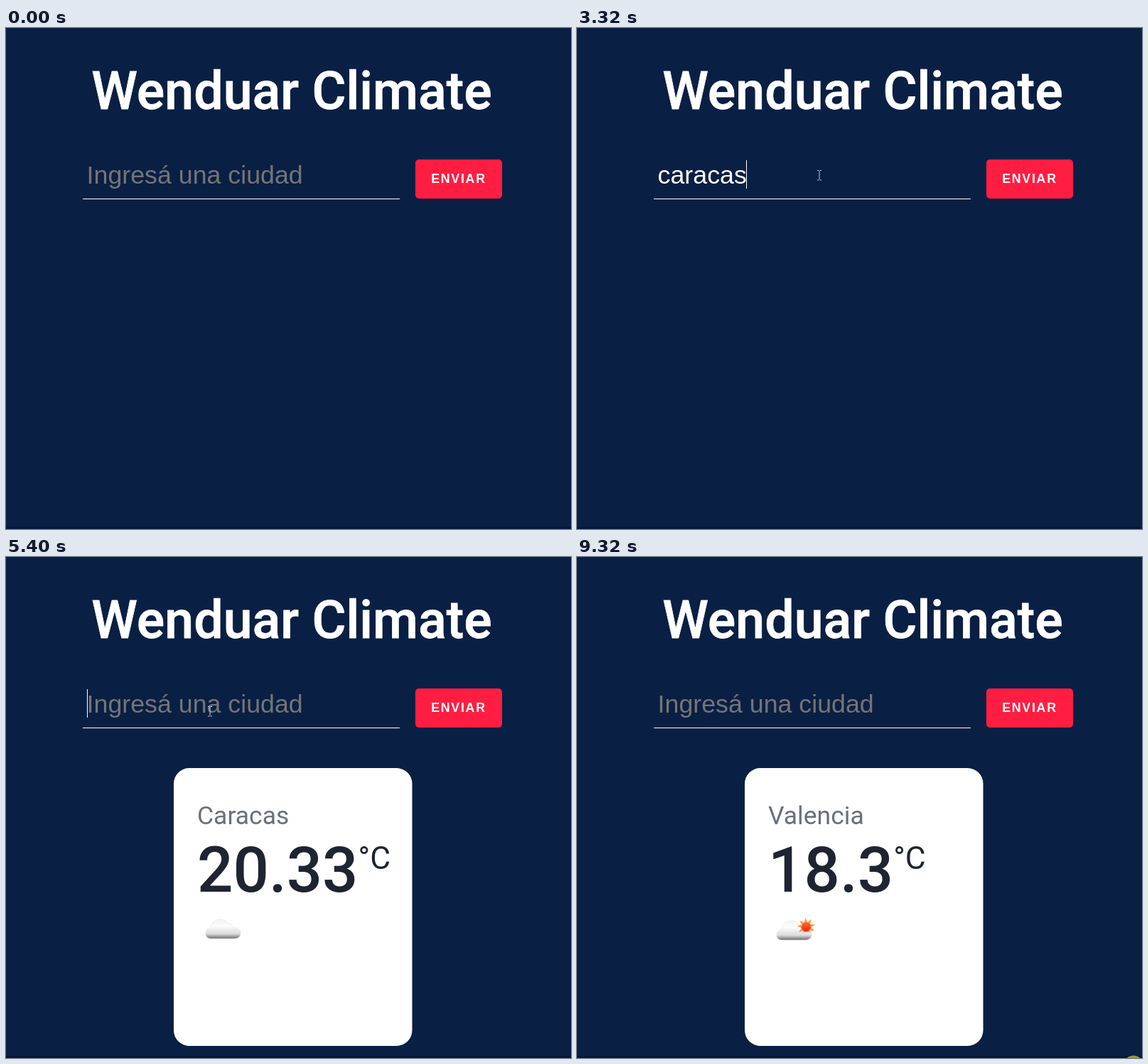
An HTML page that plays this animation: 795x705 px, repeating every 9410 ms.

```html
<!DOCTYPE html>
<html lang="es">
<head>
<meta charset="utf-8">
<title>Clima</title>
<style>
  html, body { margin: 0; width: 100%; height: 100%; overflow: hidden; background: #0a1f44; }
  svg { display: block; width: 795px; height: 705px; }
  text { white-space: pre; }
  .roboto { font-family: Roboto, sans-serif; }
  .arial { font-family: "Liberation Sans", Arial, sans-serif; }
  #title { font-size: 73.5px; font-weight: 500; fill: #fff; stroke: #fff; stroke-width: .8px; text-anchor: middle; }
  #field { font-size: 35.75px; }
  #label { font-size: 17.75px; font-weight: 700; letter-spacing: 1.75px; fill: #fff; }
  #city { font-size: 35.5px; fill: #6a6f7c; }
  #temp { font-size: 88.75px; font-weight: 500; fill: #1e2432; }
  #unit { font-size: 44.4px; fill: #1e2432; }
</style>
</head>
<body>
<svg viewBox="0 0 795 705">
  <defs>
    <linearGradient id="cloudFill" x2="0" y2="1">
      <stop offset="0" stop-color="#f4f4f4"/>
      <stop offset=".35" stop-color="#fcfcfc"/>
      <stop offset=".75" stop-color="#dcdcdc"/>
      <stop offset="1" stop-color="#6c6c6c"/>
    </linearGradient>
    <linearGradient id="sunFill" x2="0" y2="1">
      <stop offset="0" stop-color="#ff6a35"/>
      <stop offset="1" stop-color="#f3200f"/>
    </linearGradient>
    <clipPath id="aboveCloud"><rect x="305" y="500" width="35" height="28"/></clipPath>
  </defs>
  <rect width="795" height="705" fill="#0a1f44"/>
  <rect y="702" width="795" height="3" fill="#061638"/>
  <text id="title" class="roboto" x="402" y="114">Wenduar Climate</text>

  <text id="field" class="arial" x="113.6" y="218.5"></text>
  <rect x="108" y="240" width="446" height="1" fill="#fff"/>
  <rect id="caret" y="186" width="1" height="40" fill="#fff"/>
  <rect x="576" y="185" width="122" height="55" rx="5" fill="#ff1e42"/>
  <rect id="hover" x="576" y="185" width="122" height="55" rx="5" fill="#c3112d" opacity=".3"/>
  <text id="label" class="arial" x="598.2" y="218">ENVIAR</text>

  <g id="card">
    <rect x="236" y="297" width="335.5" height="391" rx="22" fill="#fff"/>
    <text id="city" class="roboto" x="269" y="376"></text>
    <text id="temp" class="roboto" x="269" y="470.5"></text>
    <text id="unit" class="roboto" y="439">°C</text>
    <path id="cloud" fill="url(#cloudFill)" stroke="#ddd" stroke-width=".5"
      d="M288 537q-8-1-7-8 1-6 7-7 2-12 13-12 8 0 11 6 6-1 8 5 10 1 10 8 0 8-9 8z"/>
    <g id="sun" clip-path="url(#aboveCloud)">
      <polygon id="rays" fill="#f6a04d"/>
      <circle cx="322.5" cy="520.5" r="6.5" fill="url(#sunFill)"/>
    </g>
  </g>

  <path id="arrow" fill="#fff" stroke="#111a2c" stroke-width=".6"
    d="M0 0V14L3.2 11 5.6 16.4 7.9 15.4 5.5 10.2H9.8Z"/>
  <path id="beam" fill="none" stroke="#c9ced8" d="M-3-6.5H-.8M.8-6.5H3M0-6V6.5M-3 7H-.8M.8 7H3"/>
  <circle id="click" cx="783" cy="716" r="14.5" fill="#a09a1e"/>
</svg>
<script>
const LOOP = 9410, BLINK = 525, FOCUS = 680, ICON_DELAY = 1020, LAST_CLICK = 9320;
const $ = id => document.getElementById(id);
const show = (id, on) => $(id).style.display = on ? '' : 'none';

// Typing starts at `from`, one letter every `step` ms, submitted at `sent`.
const searches = [
  { city: 'Caracas', temp: '20.33', from: 1060, step: 196, sent: 3380 },
  { city: 'Valencia', temp: '18.3', from: 5570, step: 146, sent: 7290 }
];

// The pointer rests between these glides.
const home = { x: 622, y: 514 };
const glides = [
  { start: 70, end: 600, x: 331, y: 207 },
  { start: 3230, end: 3320, x: 341, y: 207 },
  { start: 3380, end: 3380, x: 771, y: 255 },
  { start: 3470, end: 3550, x: 800, y: 238 },
  { start: 3850, end: 4550, x: 287, y: 217 },
  { start: 8070, end: 8770, x: 708, y: 682 },
  { start: 9240, end: LAST_CLICK, x: 783, y: 716 }
];

const easeOut = k => 1 - (1 - k) ** 2.3;

function pointerAt(t) {
  let { x, y } = home;
  for (const g of glides) {
    if (t < g.start) break;
    const k = t >= g.end ? 1 : easeOut((t - g.start) / (g.end - g.start));
    x += (g.x - x) * k;
    y += (g.y - y) * k;
  }
  return [x, y];
}

function drawField(t) {
  const field = $('field');
  const search = searches.filter(s => t >= s.from).pop();
  const typing = search && t < search.sent;
  let text = 'Ingresá una ciudad', lastInput = FOCUS;
  if (search) {
    const word = search.city.toLowerCase();
    const count = Math.min(word.length, 1 + Math.floor((t - search.from) / search.step));
    lastInput = search.from + (count - 1) * search.step;
    if (typing) text = word.slice(0, count);
  }
  field.textContent = text;
  field.setAttribute('fill', typing ? '#fff' : '#757575');
  const width = typing ? field.getComputedTextLength() : 0.4;
  $('caret').setAttribute('x', Math.floor(113.6 + width));
  show('caret', t >= FOCUS && Math.floor((t - lastInput) / BLINK) % 2 === 0);
}

function drawCard(t) {
  const done = searches.filter(s => t >= s.sent).pop();
  show('card', done);
  if (!done) return;
  $('city').textContent = done.city;
  $('temp').textContent = done.temp;
  $('unit').setAttribute('x', 269 + $('temp').getComputedTextLength());
  const icons = searches.filter(s => t >= s.sent + ICON_DELAY).length;
  show('cloud', icons > 0);
  show('sun', icons > 1);
  $('cloud').setAttribute('transform', `translate(0 ${icons > 1 ? 2 : 0})`);
}

function drawPointer(t) {
  const [x, y] = pointerAt(t);
  const inRow = y > 180 && y < 240;
  const inField = inRow && x > 108 && x < 554;
  const visible = t >= glides[0].start;
  show('beam', visible && inField);
  show('arrow', visible && !inField);
  const at = inField ? [Math.round(x), Math.round(y)] : [x, y];
  $(inField ? 'beam' : 'arrow').setAttribute('transform', `translate(${at})`);
  show('hover', inRow && x > 576 && x < 698);
  show('click', t >= LAST_CLICK);
}

$('rays').setAttribute('points', Array.from({ length: 18 }, (_, i) => {
  const a = (i * 20 - 95) * Math.PI / 180, r = i % 2 ? 7 : 13;
  return [322.5 + r * Math.cos(a), 520.5 + r * Math.sin(a)];
}).join(' '));

const start = performance.now();
function frame() {
  const t = (performance.now() - start) % LOOP;
  drawField(t);
  drawCard(t);
  drawPointer(t);
  requestAnimationFrame(frame);
}
frame();
</script>
</body>
</html>
```
